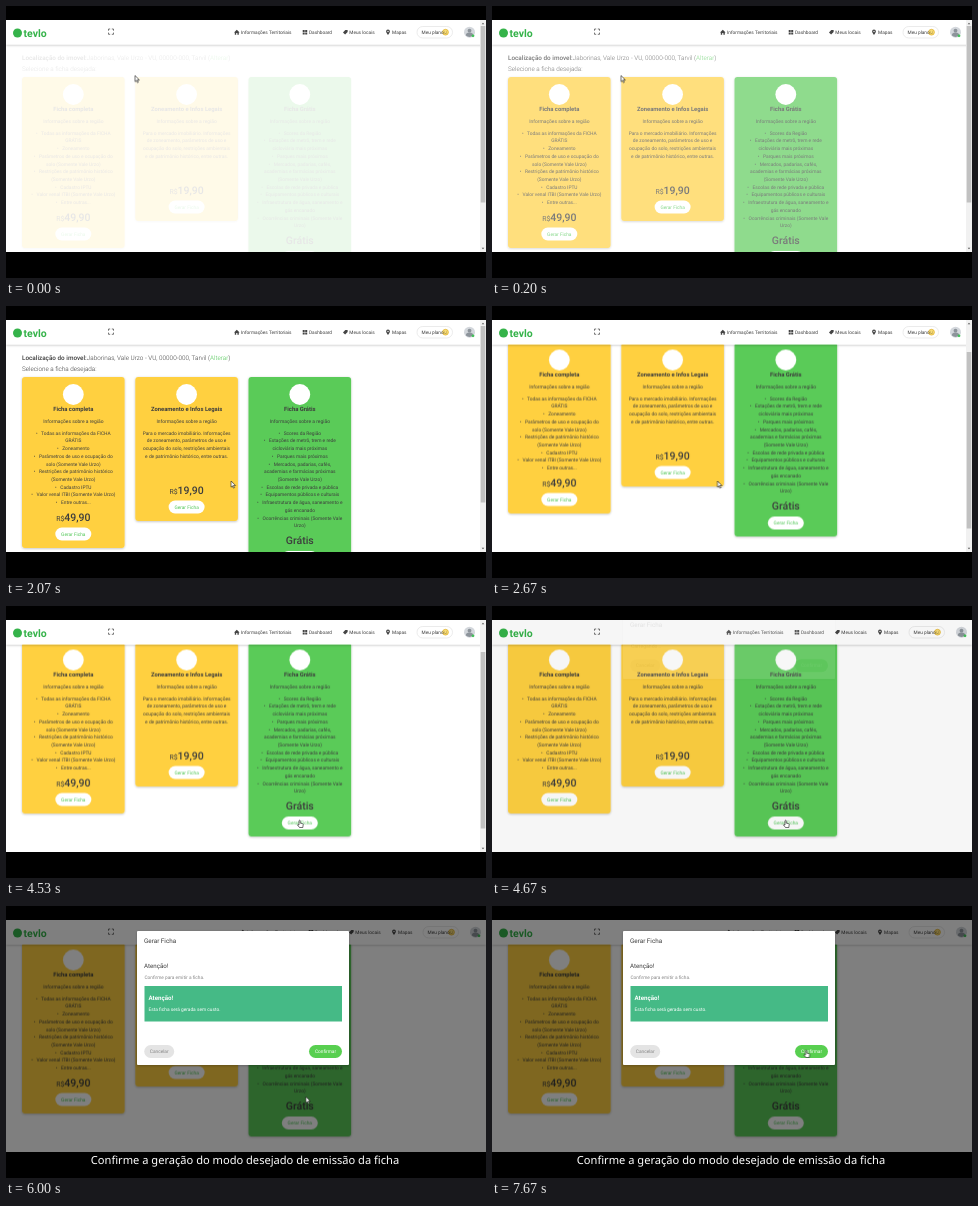
An HTML page that plays this animation: 480 px wide and 272 px high, repeating every 8000 ms.

```html
<!DOCTYPE html>
<html lang="pt-BR">
<head>
<meta charset="utf-8">
<title>Gerar ficha</title>
<style>
html, body { margin: 0; width: 100%; height: 100%; overflow: hidden; background: #000; }
svg { display: block; width: 100vw; height: 100vh; }
text { font-family: Roboto, sans-serif; text-rendering: geometricPrecision; fill: #3d3d3d; }
.mid { text-anchor: middle; }
.light { font-weight: 300; }
.bold { font-weight: 700; }
.medium { font-weight: 500; }
.green { fill: #4cc552; }
.white { fill: #fff; }
.grey { fill: #858585; }

#fade, #scroll, #thumb, #bar, #nav, #backdrop, #modal, #loading, #confirm,
#caption, #cursor, #arrow, #hand { animation: 8s linear infinite; }
#fade { animation-name: fade; }
#scroll { animation-name: scroll; }
#thumb { animation-name: thumb; }
#bar { animation-name: bar; animation-timing-function: step-end; }
#nav { animation-name: nav; animation-timing-function: step-end; }
#backdrop { animation-name: backdrop; }
#modal { animation-name: modal; }
#loading { animation-name: loading; animation-timing-function: step-end; }
#confirm { animation-name: confirm; animation-timing-function: step-end; }
#caption { animation-name: caption; animation-timing-function: step-end; }
#cursor { animation-name: cursor; }
#arrow { animation-name: arrow; animation-timing-function: step-end; }
#hand { animation-name: hand; animation-timing-function: step-end; }

@keyframes fade {
  0% { opacity: .12; animation-timing-function: ease-out; }
  5.5%, 100% { opacity: 1; }
}
@keyframes scroll {
  0%, 29.5% { transform: translateY(0); animation-timing-function: ease-in-out; }
  32.5%, 100% { transform: translateY(-34.5px); }
}
@keyframes thumb {
  0%, 29.5% { transform: translateY(0); animation-timing-function: ease-in-out; }
  32.5%, 100% { transform: translateY(26px); }
}
@keyframes bar { 0% { opacity: 1; } 58.25%, 100% { opacity: 0; } }
@keyframes nav {
  0% { transform: translateX(0); }
  58.25%, 100% { transform: translateX(6px); }
}
@keyframes backdrop {
  0%, 58.25% { opacity: 0; }
  60.2%, 100% { opacity: .5; }
}
@keyframes modal {
  0%, 58.25% { opacity: 0; transform: translateY(-17.5px); animation-timing-function: ease-out; }
  60.2% { opacity: 1; transform: translateY(-6px); animation-timing-function: ease-out; }
  62%, 100% { opacity: 1; transform: translateY(0); }
}
@keyframes loading { 0% { opacity: 1; } 63.75%, 100% { opacity: 0; } }
@keyframes confirm { 0% { opacity: 0; } 63.75%, 100% { opacity: 1; } }
@keyframes caption { 0% { opacity: 0; } 62.5%, 100% { opacity: 1; } }
@keyframes cursor {
  0%, 11.5% { transform: translate(129px, 69.5px); animation-timing-function: ease-in-out; }
  24.5% { transform: translate(225px, 175px); }
  44% { transform: translate(226px, 175px); animation-timing-function: ease-in-out; }
  53.5%, 70% { transform: translate(293px, 214px); animation-timing-function: ease-in-out; }
  82.5%, 100% { transform: translate(313.5px, 144px); }
}
@keyframes arrow { 0% { opacity: 1; } 53% { opacity: 0; } 71% { opacity: 1; } 81.5%, 100% { opacity: 0; } }
@keyframes hand { 0% { opacity: 0; } 53% { opacity: 1; } 71% { opacity: 0; } 81.5%, 100% { opacity: 1; } }
</style>
</head>
<body>
<svg viewBox="0 0 480 272" preserveAspectRatio="none">
  <defs>
    <clipPath id="screen"><rect y="14" width="480" height="232"/></clipPath>
    <filter id="soft" x="-10%" y="-10%" width="120%" height="130%">
      <feDropShadow dx="0" dy=".7" stdDeviation=".8" flood-opacity=".25"/>
    </filter>
  </defs>
  <rect width="480" height="272"/>
  <g clip-path="url(#screen)">
    <rect y="14" width="480" height="232" fill="#fff"/>
    <g id="fade"><g id="scroll"></g></g>

    <rect y="14" width="480" height="24.5" fill="#fff" filter="url(#soft)"/>
    <circle cx="11.5" cy="27" r="4.5" fill="#35b34a"/>
    <text x="17.5" y="30.7" font-size="10.5" class="bold" style="fill:#35b34a">tevlo</text>
    <path d="M102.5 24.7v-1.7h1.7M105.8 23h1.7v1.7M107.5 26.6v1.7h-1.7M104.2 28.3h-1.7v-1.7" fill="none" stroke="#555" stroke-width=".8"/>
    <g id="nav">
      <g fill="#444">
        <path d="M228 26.4l2.8-2.6 2.8 2.6h-.8v2.3h-1.4v-1.6h-1.2v1.6h-1.4v-2.3z"/>
        <path d="M296.7 24h2v1.9h-2zM299.2 24h2v1.9h-2zM296.7 26.5h2v1.9h-2zM299.2 26.5h2v1.9h-2z"/>
        <path d="M337 26.4l2.3-2.5 2.3 0 0 2.1-2.5 2.6z"/>
        <path d="M382 29c-1-1.5-1.9-2.4-1.9-3.5a1.9 1.9 0 0 1 3.8 0c0 1.100-.9 2-1.900 3.500z"/>
      </g>
      <circle cx="382" cy="25.500" r=".7" fill="#fff"/>
      <rect x="411" y="20.500" width="35.500" height="11.500" rx="5.700" fill="#fff" stroke="#e2e2e2" stroke-width=".7"/>
      <circle cx="439.500" cy="26.200" r="2.900" fill="#f7dc79" stroke="#dfae25" stroke-width=".7"/>
      <path d="M438 26.700q1.500 1.700 3 0M438.500 25.200v.4M440.500 25.200v.4" fill="none" stroke="#7d6420" stroke-width=".5"/>
      <circle cx="463.500" cy="26.200" r="5.500" fill="#d3d7dc"/>
      <circle cx="463.500" cy="24.700" r="1.900" fill="#8d949b"/>
      <path d="M459.800 29.600a3.700 3.200 0 0 1 7.400 0q-3.700 2.700-7.400 0z" fill="#8d949b"/>
      <circle cx="467" cy="29.800" r="1.400" fill="#43c05a"/>
    </g>

    <g id="bar">
      <rect x="474" y="14" width="6" height="232" fill="#f1f1f1"/>
      <rect id="thumb" x="474.700" y="20" width="4.600" height="176.500" fill="#c1c1c1"/>
      <path d="M475.700 18.200l1.300-1.500 1.300 1.500zM475.700 241.800l1.300 1.500 1.300-1.500z" fill="#555"/>
    </g>

    <rect id="backdrop" y="14" width="480" height="232"/>
    <g id="modal">
      <g id="loading"><rect x="131" y="25" width="212" height="64" rx="1" fill="#fff" filter="url(#soft)"/></g>
      <g id="confirm">
        <rect x="131" y="25" width="212" height="134" rx="1" fill="#fff" filter="url(#soft)"/>
        <rect x="138.500" y="80" width="197.500" height="35.500" fill="#45ba86"/>
      </g>
    </g>
  </g>
  <text id="caption" x="239" y="258.300" font-size="11.100" class="mid white" style="font-family:'Noto Sans',sans-serif">Confirme a geração do modo desejado de emissão da ficha</text>
  <g id="cursor">
    <path id="arrow" d="M0 0v6.200l1.400-1.300 1 2.200 1-.4-1-2.200h2z" fill="#fff" stroke="#111" stroke-width=".6"/>
    <path id="hand" d="M0 .6q.6-.8 1.200 0v2.500l2.500.6q.6.200.5.900l-.4 2.900h-3.300l-2-2.600q.3-.8 1.500.1z" fill="#fff" stroke="#111" stroke-width=".6"/>
  </g>
</svg>
<script>
const byId = id => document.getElementById(id);

function draw(parent, tag, attrs, content = "") {
  const node = document.createElementNS("http://www.w3.org/2000/svg", tag);
  for (const key in attrs) node.setAttribute(key, attrs[key]);
  node.textContent = content;
  parent.append(node);
  return node;
}

// Places a line of text around its optical middle.
const write = (parent, x, middle, size, style, content) =>
  draw(parent, "text", { x, y: middle + size * .34, "font-size": size, class: style }, content);

function pill(parent, x, y, width, fill, style, label) {
  draw(parent, "rect", { x: x - width / 2, y: y - 6.5, width, height: 13, rx: 6.5, fill });
  write(parent, x, y, 4.8, "mid " + style, label);
}

const page = byId("scroll");
const address = write(page, 16, 52, 6.33, "light", "");
draw(address, "tspan", { class: "medium" }, "Localização do imovel:");
draw(address, "tspan", {}, "Jaborinas, Vale Urzo - VU, 00000-000, Tarvil (");
draw(address, "tspan", { class: "green" }, "Alterar");
draw(address, "tspan", {}, ")");
write(page, 16, 63.3, 6.33, "light", "Selecione a ficha desejada:");

// An asterisk marks lines that open a list item.
const cards = [
  { x: 16, bottom: 242, fill: "#ffd03f", title: "Ficha completa", price: "49,90", priceY: 211,
    lines: ["*Todas as informações da FICHA", "GRÁTIS", "*Zoneamento",
      "*Parâmetros de uso e ocupação do", "solo (Somente Vale Urzo)",
      "*Restrições de patrimônio histórico", "(Somente Vale Urzo)", "*Cadastro IPTU",
      "*Valor venal ITBI (Somente Vale Urzo)", "*Entre outras..."] },
  { x: 129.3, bottom: 215, fill: "#ffd03f", title: "Zoneamento e Infos Legais", price: "19,90", priceY: 184,
    lines: ["Para o mercado imobiliário. Informações", "de zoneamento, parâmetros de uso e",
      "ocupação do solo, restrições ambientais", "e de patrimônio histórico, entre outras."] },
  { x: 242.5, bottom: 265, fill: "#5acb58", title: "Ficha Grátis", priceY: 234.5,
    lines: ["*Scores da Região", "*Estações de metrô, trem e rede", "cicloviária mais próximas",
      "*Parques mais próximos", "*Mercados, padarias, cafés,", "academias e farmácias próximas",
      "(Somente Vale Urzo)", "*Escolas de rede privada e pública", "*Equipamentos públicos e culturais",
      "*Infraestrutura de água, saneamento e", "gás encanado",
      "*Ocorrências criminais (Somente Vale", "Urzo)"] }
];

for (const { x, bottom, fill, title, price, priceY, lines } of cards) {
  const center = x + 51.3;
  draw(page, "rect", { x, y: 71, width: 102.6, height: bottom - 71, rx: 3, fill, filter: "url(#soft)" });
  draw(page, "circle", { cx: center, cy: 88.5, r: 10.4, fill: "#fff" });
  write(page, center, 103, 5.85, "mid bold", title);
  write(page, center, 115, 4.95, "mid", "Informações sobre a região");
  lines.forEach((line, i) =>
    write(page, center, 127 + i * 7.73, 4.85, "mid", line.replace("*", "•\u00a0\u00a0\u00a0")));
  const amount = write(page, center, priceY, 10.5, "mid medium", price ? "" : "Grátis");
  if (price) {
    draw(amount, "tspan", { "font-size": 6.9, "font-weight": 400 }, "R$");
    draw(amount, "tspan", {}, price);
  }
  pill(page, center, priceY + 17, 36, "#fff", "green", "Gerar Ficha");
}

const nav = byId("nav");
[[235, "Informações Territoriais"], [303, "Dashboard"], [343.3, "Meus locais"], [386, "Mapas"], [415.5, "Meu plano"]]
  .forEach(([x, label]) => write(nav, x, 26.3, 4.75, "", label));

const loading = byId("loading"), confirm = byId("confirm");
for (const view of [loading, confirm]) write(view, 138, 35, 6.33, "", "Gerar Ficha");

write(loading, 139, 56, 5.1, "grey", "Carregando...");
pill(loading, 153.2, 75.7, 30, "#e4e4e4", "grey", "Cancelar");
pill(loading, 319.5, 75.7, 33, "#98dd96", "white", "Confirmar");

write(confirm, 138, 60, 6.2, "", "Atenção!");
write(confirm, 138.5, 71.5, 4.75, "grey", "Confirme para emitir a ficha.");
write(confirm, 142.5, 91.5, 6.2, "bold white", "Atenção!");
write(confirm, 142.5, 103.3, 4.8, "white", "Esta ficha será gerada sem custo.");
pill(confirm, 153.2, 145.5, 30, "#e4e4e4", "grey", "Cancelar");
pill(confirm, 319.5, 145.5, 33, "#58cf50", "white", "Confirmar");
</script>
</body>
</html>
```
